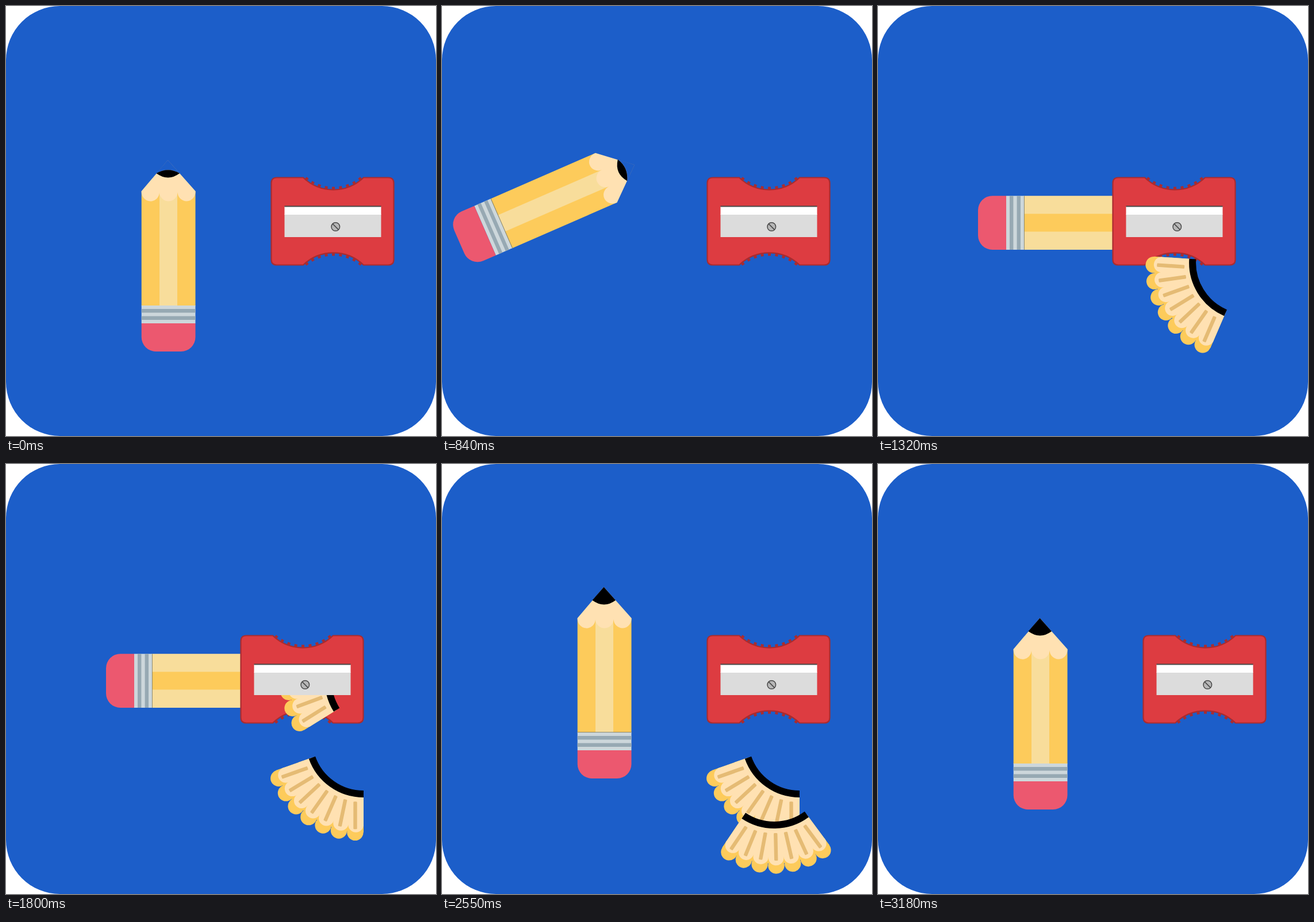
These frames come from a looping animation (748x748 px, 3.63 s). An HTML page:

```html
<!DOCTYPE html>
<html lang="en">
<head>
<meta charset="utf-8">
<title>Pencil and sharpener</title>
<style>
  html, body { margin: 0; height: 100%; overflow: hidden; background: #fff; }
  svg { display: block; width: 100vw; height: 100vh; }
</style>
</head>
<body>
<svg viewBox="0 0 748 748">
  <defs>
    <clipPath id="card"><rect width="748" height="748" rx="94"/></clipPath>
    <clipPath id="belowBlade"><rect y="402" width="748" height="346"/></clipPath>
    <g id="fan"></g>
  </defs>
  <g clip-path="url(#card)">
    <rect width="748" height="748" fill="#1c5ec9"/>

    <g id="pencil">
      <rect id="body" x="235.7" y="322" width="93.8" height="200"/>
      <rect id="stripe" x="267" y="322" width="31" height="200"/>
      <path fill="#ffe1b2" d="M281.5 268L329.5 322a15.6 16.5 0 0 1-31.2 2a15.6 15.5 0 0 1-31.2 0a15.6 16.5 0 0 1-31.4-2Z"/>
      <path id="blunt" fill="#1c5ec9" stroke="#2a5fbd" stroke-width=".7" d="M261.5 291L281.5 268L302 291Q282 279 261.5 291Z"/>
      <path id="lead"/>
      <path fill="#cdd7db" d="M235.7 521h93.8v31h-93.8z"/>
      <path fill="#97a9b3" d="M235.7 527h93.8v6.4h-93.8zM235.7 539.6h93.8v6.4h-93.8z"/>
      <path fill="#ec586f" d="M235.7 552h93.8v24a25 25 0 0 1-25 25h-43.8a25 25 0 0 1-25-25z"/>
      <path id="seam" stroke="#6f7468" stroke-width=".8" d="M235.7 520.6h93.8"/>
    </g>

    <g id="sharpener">
      <path fill="#dd3c41" stroke="#a92c30" stroke-width="2.2" d="M471 298.5H517A76 76 0 0 0 622 298.5H665q9.5 0 9.5 9.5V441q0 9.5-9.5 9.5H622A76 76 0 0 0 517 450.5H471q-9.5 0-9.5-9.5V308q0-9.5 9.5-9.5Z"/>
      <g id="teeth" fill="#a92c30"></g>
      <path fill="#dcdcdc" d="M484.5 362h168v40h-168z"/>
      <path fill="#fff" d="M484.5 349h168v14h-168z"/>
      <path fill="#4a4a4a" d="M484.5 347.5h168v2h-168z"/>
      <g fill="#b7b7b7" stroke="#484848" stroke-width="1.5">
        <circle cx="573.3" cy="384" r="7.3"/>
        <path d="M568.2 378.9l10.2 10.2"/>
      </g>
    </g>

    <g clip-path="url(#belowBlade)">
      <g id="shavings">
        <use id="first" href="#fan"/>
        <use id="second" href="#fan"/>
      </g>
    </g>
  </g>
</svg>
<script>
const LOOP = 3630, STEP = 30;
const YELLOW = '#fdcb5b', LIGHT = '#f8dd9b', WOOD = '#ffe1b2';
const $ = id => document.getElementById(id);
const set = (id, name, value) => $(id).setAttribute(name, value);
const show = (id, on) => set(id, 'visibility', on ? 'visible' : 'hidden');
const place = (id, x, y = 0, angle = 0) =>
  set(id, 'transform', `translate(${x} ${y}) rotate(${angle})`);
const polar = (r, deg) => [r * Math.cos(deg * Math.PI / 180), r * Math.sin(deg * Math.PI / 180)];
const mix = (a, b, k) => a + (b - a) * k;

// A shaving: a fan of seven ribs whose centre of curvature is at (81, -103).
function buildFan() {
  const from = 90, to = 160.5, mid = (from + to) / 2;
  const ring = (inner, outer, color) => {
    const r = (inner + outer) / 2;
    return `<path fill="none" stroke="${color}" stroke-width="${outer - inner}"
      d="M${polar(r, from)}A${r} ${r} 0 0 1 ${polar(r, to)}"/>`;
  };
  const ribs = draw => Array.from({ length: 7 }, (_, i) => draw(i / 3 - 1)).join('');
  const lobes = (radius, size, color) => ribs(u => {
    const [x, y] = polar(radius + 3 * (1 - u * u), mid + 30.1 * u);
    return `<circle cx="${x}" cy="${y}" r="${size}" fill="${color}"/>`;
  });
  const grooves = ribs(u => `<rect x="-24" y="-3.2" width="48" height="6.4" rx="1.5" fill="#e5bb74"
    transform="translate(${polar(133, mid + 29 * u)}) rotate(${mid + 35.2 * u})"/>`);
  $('fan').innerHTML = '<g transform="translate(81 -103)">' +
    ring(95, 162, YELLOW) + lobes(162.5, 14.2, YELLOW) +
    ring(95, 151, WOOD) + lobes(149, 13.3, WOOD) +
    grooves + ring(89, 101, '#000') + '</g>';
}

function buildTeeth() {
  let out = '';
  for (const flip of ['', 'translate(0 749) scale(1 -1)'])
    for (let i = -4; i <= 4; i++)
      out += `<rect x="567" y="314.5" width="5" height="5" transform="${flip} rotate(${i * 9.7} 569.5 243)"/>`;
  $('teeth').innerHTML = out;
}

function draw(now) {
  const t = Math.floor(now % LOOP / STEP) * STEP;
  // Quadratic ease in and out, from 0 to 1.
  const ease = (from, to) => {
    const k = Math.min(1, Math.max(0, (t - from) / (to - from)));
    return k < .5 ? 2 * k * k : 1 - 2 * (1 - k) ** 2;
  };

  // Lift, swing left, push in; later pull out, swing upright, settle.
  const x = 282.5 - 114.5 * ease(540, 780) + 172.5 * ease(770, 1110)
    - 118.5 * ease(1980, 2250) + 60.5 * ease(2220, 2415);
  const y = 434.5 - 142 * ease(330, 540) + 84.5 * ease(540, 1080)
    - 50.5 * ease(2190, 2370) + 108 * ease(2370, 2730);
  const angle = 90 * (ease(540, 1010) - ease(2190, 2415));
  set('pencil', 'transform', `translate(${x} ${y}) rotate(${angle}) translate(-282.5 -434.5)`);

  // The faces alternate while the pencil turns in the sharpener.
  const turning = t >= 1080 && t < 1440 || t >= 1680 && t < 2040;
  const swapped = turning && Math.floor((t - 1080) / 120) % 2 === 0;
  set('body', 'fill', swapped ? LIGHT : YELLOW);
  set('stripe', 'fill', swapped ? YELLOW : LIGHT);

  const sharp = t >= 1410;
  show('blunt', !sharp);
  set('lead', 'd', `M261.5 291${sharp ? 'L281.5 268L' : 'Q282 279.5 '}302 291Q282 306 261.5 291Z`);
  show('seam', t >= 840 && t < 2760);

  place('sharpener', 53 * (ease(1980, 2190) - ease(960, 1140)));

  const a = ease(1110, 1440), b = ease(1680, 2010);
  place('first', mix(488, 541, a), mix(306, 582, a), mix(88, 0, a));
  place('second', mix(508, 574, b), mix(255, 664, b), mix(92, -36.5, b));
  place('shavings', 292 * ease(2715, 3180));
}

buildFan();
buildTeeth();
let start;
function tick(now) {
  start ??= now;
  draw(now - start);
  requestAnimationFrame(tick);
}
draw(0);
requestAnimationFrame(tick);
</script>
</body>
</html>
```
